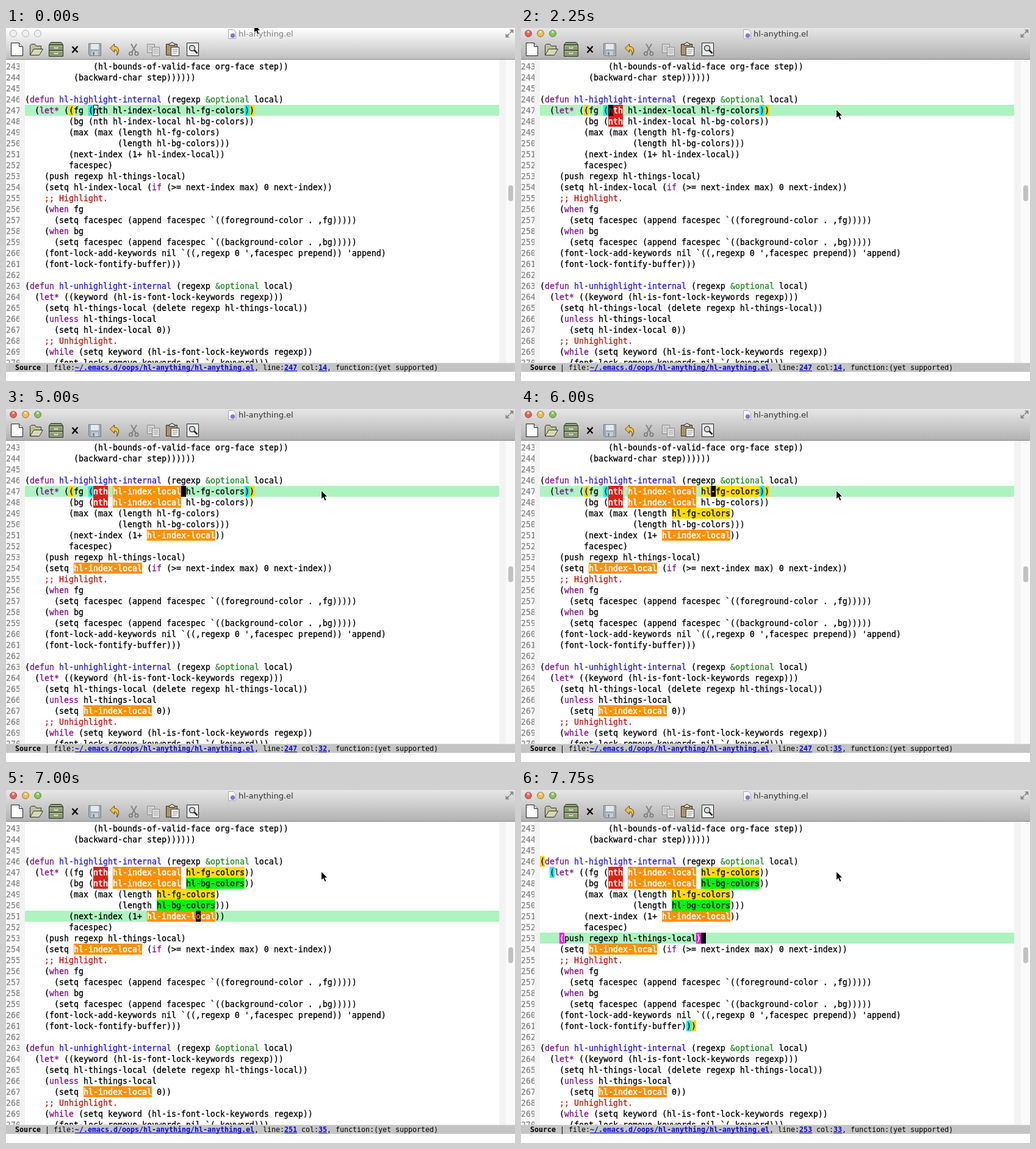
An HTML page with a canvas that plays this animation: 834x579 px, repeating every 8 s.

```html
<!DOCTYPE html>
<html lang="en">
<head>
<meta charset="utf-8">
<title>hl-anything.el</title>
<style>
  html, body { margin: 0; width: 100%; height: 100%; overflow: hidden; background: #fff; }
  canvas { display: block; }
</style>
</head>
<body>
<canvas id="stage" width="834" height="579"></canvas>
<script>
const ctx = document.getElementById('stage').getContext('2d');
const LOOP = 8000, FIRST_LINE = 243, LEFT = 31, RIGHT = 808, CHAR = 8, ROW = 18, MODE_TOP = 549;
const CODE_FONT = '13.29px "DejaVu Sans Mono", monospace';
const MODE_FONT = '11.63px "DejaVu Sans Mono", monospace';
const LINE_GREEN = '#adf3c0';

const lines = `              (hl-bounds-of-valid-face org-face step))
          (backward-char step))))))

(defun hl-highlight-internal (regexp &optional local)
  (let* ((fg (nth hl-index-local hl-fg-colors))
         (bg (nth hl-index-local hl-bg-colors))
         (max (max (length hl-fg-colors)
                   (length hl-bg-colors)))
         (next-index (1+ hl-index-local))
         facespec)
    (push regexp hl-things-local)
    (setq hl-index-local (if (>= next-index max) 0 next-index))
    ;; Highlight.
    (when fg
      (setq facespec (append facespec \`((foreground-color . ,fg)))))
    (when bg
      (setq facespec (append facespec \`((background-color . ,bg)))))
    (font-lock-add-keywords nil \`((,regexp 0 ',facespec prepend)) 'append)
    (font-lock-fontify-buffer)))

(defun hl-unhighlight-internal (regexp &optional local)
  (let* ((keyword (hl-is-font-lock-keywords regexp)))
    (setq hl-things-local (delete regexp hl-things-local))
    (unless hl-things-local
      (setq hl-index-local 0))
    ;; Unhighlight.
    (while (setq keyword (hl-is-font-lock-keywords regexp))
      (font-lock-remove-keywords nil \`(,keyword)))`.split('\n');

const syntax = [
  [/;;.*/g, '#c41a16'],
  [/(?<=\()(defun|let\*|if|when|unless|while)(?= )/g, '#86138c'],
  [/(?<=\(defun )\S+/g, '#2a1ae0'],
  [/&optional/g, '#1f8b24'],
];

const highlights = [
  { word: 'nth', back: '#dc2016', ink: '#fff' },
  { word: 'hl-index-local', back: '#ff9000', ink: '#fff' },
  { word: 'hl-fg-colors', back: '#ffdc00', ink: '#000' },
  { word: 'hl-bg-colors', back: '#00f60c', ink: '#000' },
];

// Each paren: line, column, background, ink.
const parens = {
  none: [],
  inner: [[247, 9, '#ffd800'], [247, 46, '#ffd800'], [247, 13, '#00f4fa'], [247, 45, '#00f4fa']],
  outer: [[246, 0, '#ffd800'], [261, 31, '#ffd800'], [247, 2, '#00f4fa'], [261, 30, '#00f4fa'],
          [253, 4, '#ff00f0', '#fff'], [253, 32, '#ff00f0', '#fff']],
};

// Changes that take hold at each time and stay until overridden.
const timeline = [
  [0, { line: 247, col: 14, cursor: 'hollow', mouse: [406, -7], match: 'inner', words: 0, active: false }],
  [250, { mouse: [382, -2] }],
  [500, { mouse: [382, 4] }],
  [750, { cursor: 'on' }],
  [1000, { cursor: 'off', active: true }],
  [1250, { cursor: 'on' }],
  [1750, { cursor: 'off', mouse: [516, 133] }],
  [2250, { cursor: 'on', words: 1 }],
  [2750, { cursor: 'off' }],
  [3000, { cursor: 'on', col: 17 }],
  [3500, { col: 20 }],
  [4000, { cursor: 'off' }],
  [4250, { cursor: 'on', words: 2 }],
  [4750, { col: 26, match: 'none' }],
  [5000, { col: 32, match: 'inner' }],
  [5250, { col: 35 }],
  [5750, { words: 3, match: 'none' }],
  [6000, { match: 'inner' }],
  [6250, { line: 248, match: 'none' }],
  [6500, { line: 250 }],
  [6750, { words: 4 }],
  [7000, { line: 251 }],
  [7250, { line: 252, col: 18 }],
  [7500, { line: 253, col: 33 }],
  [7750, { match: 'outer' }],
];

const stateAt = t => Object.assign({}, ...timeline.filter(([at]) => at <= t).map(([, change]) => change));
const rowTop = line => 54 + (line - FIRST_LINE) * ROW;
const colX = col => LEFT + col * CHAR;

function rect(x, y, w, h, color) {
  ctx.fillStyle = color;
  ctx.fillRect(x, y, w, h);
}

// Weight thickens the strokes of the letters.
function text(str, x, y, color, weight = 0) {
  ctx.fillStyle = ctx.strokeStyle = color;
  ctx.fillText(str, x, y);
  if (weight) {
    ctx.lineWidth = weight;
    ctx.strokeText(str, x, y);
  }
}

function shape(d, fill, stroke, width = 1) {
  const path = new Path2D(d);
  if (fill) { ctx.fillStyle = fill; ctx.fill(path); }
  if (stroke) { ctx.strokeStyle = stroke; ctx.lineWidth = width; ctx.stroke(path); }
}

function disc(x, y, r, fill, stroke, width = 1) {
  ctx.beginPath();
  ctx.arc(x, y, r, 0, Math.PI * 2);
  if (fill) { ctx.fillStyle = fill; ctx.fill(); }
  if (stroke) { ctx.strokeStyle = stroke; ctx.lineWidth = width; ctx.stroke(); }
}

function gradient(y0, y1, top, bottom) {
  const g = ctx.createLinearGradient(0, y0, 0, y1);
  g.addColorStop(0, top);
  g.addColorStop(1, bottom);
  return g;
}

function drawToolbar() {
  // New, open, directory
  shape('M8.5 24.5h13l6 6v15h-19z', '#fdfdfd', '#222');
  shape('M21.5 24.5v6h6', '#ddd', '#222');
  shape('M39.5 44.5v-16l2-2h6l2 3h8v5', '#bfc096', '#333');
  shape('M39.5 44.5l6-10h15l-6 10z', '#d6d8b4', '#333');
  shape('M70.5 27.5l3-4h17l3 4v19h-23z', '#8a9b74', '#26331f');
  shape('M71 27.5h22M71 36.5h22', null, '#26331f');
  shape('M72 29.5h20M72 38.5h20', null, '#b4c0a2');
  shape('M79.5 31v2h5v-2M79.5 40v2h5v-2', null, '#ece6c4', 1.5);
  // Close, save, undo
  shape('M108.5 30.5l9 9.5M117.5 30l-9 10.5', null, '#0a0a0a', 2.4);
  shape('M135.5 25.5h20v20h-18l-2-2z', '#a3adb6', '#747c84');
  shape('M139 26h13v9h-13z', '#e6e9eb');
  shape('M140 38h11v7h-11z', '#c9ced2');
  shape('M142 39.5h3v5h-3z', '#808890');
  shape('M170.5 33l7-7v4c7 0 10 8 4 15c2-6 0-9-4-9v4z', '#edc04a', '#5b4510');
  // Cut, copy, paste, search
  shape('M205 26l8 14M214 26l-8 14', null, '#858585', 2);
  disc(204.5, 42, 2.7, null, '#777', 1.6);
  disc(214, 42, 2.7, null, '#777', 1.6);
  shape('M231.5 26.5h12v14h-12z', '#d9d9d9', '#888');
  shape('M239.5 31.5h12v14h-12z', '#dedede', '#888');
  shape('M233.5 30h6M233.5 33h5M233.5 36h5M241.5 35h8M241.5 38h8M241.5 41h8', null, '#a2a2a2');
  shape('M262.5 26.5h18v18h-18z', '#a8946c', '#30291c');
  shape('M267.5 28.5v-3h2l1-2h3l1 2h2v3z', '#d5d5d5', '#333');
  shape('M270.5 31.5h13v14h-13z', '#fff', '#333');
  shape('M272.5 35h9M272.5 38h9M272.5 41h7', null, '#777');
  shape('M296.5 24.5h19v21h-19z', '#efefef', '#222');
  disc(305, 33, 4.5, '#d5e0e4', '#333', 1.4);
  shape('M308.5 36.5l5 5', null, '#222', 2.6);
}

function drawWindowChrome(active) {
  rect(0, 0, 834, 52, active ? gradient(0, 52, '#e6e6e6', '#b1b1b1') : gradient(0, 52, '#ffffff', '#bfbfbf'));
  rect(0, 51, 834, 1, '#858585');
  const lights = active ? ['#ec5f55', '#f3bd46', '#86c356'] : Array(3).fill('#f0f0f0');
  lights.forEach((color, i) => {
    const x = 12 + i * 20;
    disc(x, 9, 5.5, color, active ? '#0006' : '#b0b0b0');
    if (active) disc(x, 6.5, 2.2, '#fff8');
  });
  shape('M364.5 2.5h8l4 4v11h-12z', '#f5f5fb', '#a5a5b8');
  disc(371.5, 12.5, 3.7, '#8579c8');
  ctx.font = '13px "DejaVu Sans", sans-serif';
  text('hl-anything.el', 381, 14, active ? '#333' : '#808080');
  shape('M825 2.5h6.5v6.5zM818.5 9v6.5h6.5z', '#8a8a8a');
  shape('M825.5 8.5l4-4M820.5 13.5l4-4', null, '#8a8a8a', 2);
  drawToolbar();
}

function codeText(str, x, y, color) {
  text(str, x, y + 14, color, color === '#fff' ? 0.6 : 0.3);
}

function drawSpan(line, col, length, back, ink = '#000') {
  const x = colX(col), y = rowTop(line);
  rect(x, y, length * CHAR, ROW, back);
  codeText(lines[line - FIRST_LINE].slice(col, col + length), x, y, ink);
}

function drawLine(str, line, current) {
  const y = rowTop(line);
  const back = line === current ? LINE_GREEN : '#fff';
  rect(LEFT, y, RIGHT - LEFT, ROW, back);
  codeText(String(line), 0, y, '#868686');
  codeText(str, LEFT, y, '#000');
  for (const [pattern, color] of syntax) {
    for (const found of str.matchAll(pattern)) drawSpan(line, found.index, found[0].length, back, color);
  }
}

function drawCursor({ line, col, cursor }, back) {
  const x = colX(col), y = rowTop(line);
  if (cursor === 'on') drawSpan(line, col, 1, '#000', back);
  if (cursor === 'hollow') {
    drawSpan(line, col, 1, '#fff');
    ctx.strokeStyle = '#000';
    ctx.lineWidth = 1;
    ctx.strokeRect(x + 0.5, y + 0.5, CHAR - 1, ROW - 1);
  }
}

function drawBuffer(state) {
  ctx.save();
  ctx.beginPath();
  ctx.rect(0, 52, 834, MODE_TOP - 52);
  ctx.clip();
  ctx.font = CODE_FONT;
  lines.forEach((str, i) => drawLine(str, FIRST_LINE + i, state.line));
  rect(22, 52, 9, 500, '#f3f3f3');
  rect(RIGHT, 52, 11, 500, '#f3f3f3');
  rect(819, 52, 15, 500, '#fafafa');

  let cursorBack = LINE_GREEN;
  highlights.slice(0, state.words).forEach(({ word, back, ink }, rank) => {
    lines.forEach((str, i) => {
      const line = FIRST_LINE + i, col = str.indexOf(word);
      // The newest word is not painted on its own line until point leaves it.
      if (col < 0 || (rank === 3 && line === 250 && state.line === 250)) return;
      drawSpan(line, col, word.length, back, ink);
      if (line === state.line && state.col >= col && state.col < col + word.length) cursorBack = back;
    });
  });
  for (const [line, col, back, ink] of parens[state.match]) drawSpan(line, col, 1, back, ink);
  drawCursor(state, cursorBack);

  ctx.fillStyle = '#c1c1c1';
  ctx.beginPath();
  ctx.roundRect(823, 258, 8, 26, 4);
  ctx.fill();
  ctx.restore();
}

function drawModeLine({ line, col }) {
  rect(0, MODE_TOP, 834, 15, '#c4c4c4');
  rect(0, MODE_TOP, 834, 1, '#dadada');
  rect(0, MODE_TOP + 15, 834, 15, '#fff');
  let x = 15;
  const put = (str, style = '') => {
    const link = style === 'link', color = link ? '#0a0ae0' : '#000';
    ctx.font = (style && 'bold ') + MODE_FONT;
    text(str, x, 561, color);
    if (link) rect(x, 562, str.length * 7, 1, color);
    x += str.length * 7;
  };
  put('Source', 'bold');
  put(' | file:');
  put('~/.emacs.d/oops/hl-anything/hl-anything.el', 'link');
  put(', line:');
  put(String(line), 'link');
  put(' col:');
  put(String(col), 'link');
  put(', function:(yet supported)');
}

function drawMouse([x, y]) {
  ctx.save();
  ctx.translate(x + 0.5, y + 0.5);
  shape('M0 0V14.5L3.4 11.4L5.8 17L8.4 15.9L6 10.5H10.5Z', '#000', '#fff');
  ctx.restore();
}

function draw(now) {
  const state = stateAt(now % LOOP);
  rect(0, 0, 834, 579, '#fff');
  drawBuffer(state);
  drawWindowChrome(state.active);
  drawModeLine(state);
  drawMouse(state.mouse);
}

const start = performance.now();
function tick() {
  draw(performance.now() - start);
  requestAnimationFrame(tick);
}
tick();
</script>
</body>
</html>
```
